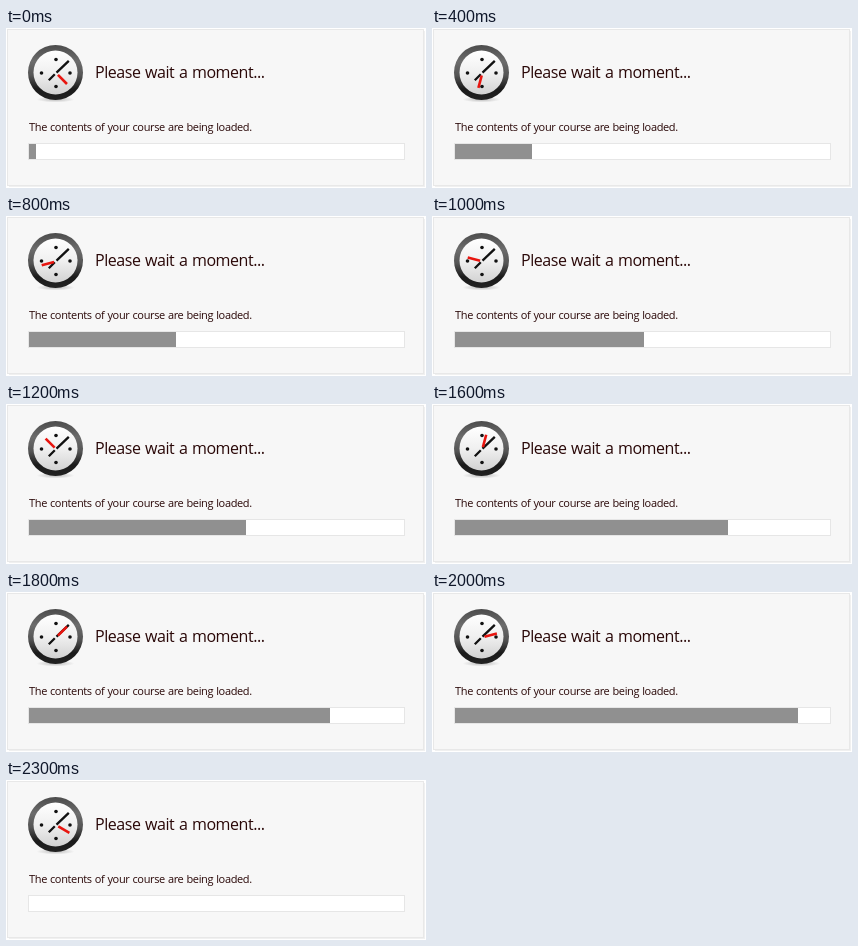
Recreate the animation shown at these times as an HTML page. Size 420 px wide and 160 px high, loop 2.4 s.

```html
<!DOCTYPE html>
<html lang="en">
<head>
<meta charset="utf-8">
<title>Loading</title>
<style>
  html, body { margin: 0; width: 100%; height: 100%; overflow: hidden; background: #fff; }
  svg { display: block; }
  text { font-family: "Open Sans", "Noto Sans", sans-serif; fill: #2a0808; }
  .title { font-size: 16px; letter-spacing: -.45px; word-spacing: .9px; }
  .note { font-size: 11px; letter-spacing: -.35px; word-spacing: .5px; }
</style>
</head>
<body>
<svg width="420" height="160" viewBox="0 0 420 160">
  <defs>
    <linearGradient id="rim" x2="0" y2="1">
      <stop stop-color="#4c4c4c"/>
      <stop offset=".3" stop-color="#6c6c6c"/>
      <stop offset=".55" stop-color="#555"/>
      <stop offset=".8" stop-color="#1a1a1a"/>
      <stop offset="1" stop-color="#222"/>
    </linearGradient>
    <linearGradient id="face" x2="0" y2="1">
      <stop stop-color="#fff"/>
      <stop offset=".5" stop-color="#f0f0f0"/>
      <stop offset="1" stop-color="#d2d2d2"/>
    </linearGradient>
    <radialGradient id="shade">
      <stop stop-color="#bbb"/>
      <stop offset="1" stop-color="#f7f7f7"/>
    </radialGradient>
  </defs>

  <!-- panel -->
  <rect x="3" y="3" width="416" height="156" fill="#f0f0f0"/>
  <rect x="1.5" y="1.5" width="416" height="156" fill="#f7f7f7" stroke="#e8e8e8"/>

  <!-- clock -->
  <ellipse cx="49.5" cy="71.5" rx="19" ry="3" fill="url(#shade)"/>
  <circle cx="49.5" cy="44.5" r="27.5" fill="url(#rim)"/>
  <circle cx="49.5" cy="44.5" r="22" fill="url(#face)"/>
  <g fill="#111">
    <circle cx="50" cy="31.5" r="1.8"/>
    <circle cx="64" cy="45" r="1.8"/>
    <circle cx="50" cy="58.5" r="1.8"/>
    <circle cx="35.5" cy="45" r="1.8"/>
  </g>
  <path d="M42.8 52.2L48.8 46.3M50.5 44.7L62.8 32.8" stroke="#111" stroke-width="2.3"/>
  <path id="hand" d="M50.3 43V30.2" stroke="#e8150f" stroke-width="2.6"/>

  <text class="title" x="89" y="50">Please wait a moment...</text>
  <text class="note" x="23" y="103">The contents of your course are being loaded.</text>

  <!-- progress bar -->
  <rect x="22.5" y="115.5" width="376" height="16" fill="#fff" stroke="#e6e6e6"/>
  <rect id="fill" x="23" y="116" height="15" fill="#909090"/>
</svg>
<script>
  const hand = document.getElementById("hand");
  const fill = document.getElementById("fill");
  const STEP = 100, STEPS = 24, FULL = 375;

  // The bar grows in 14 px blocks, a little slower between steps 12 and 18.
  function barWidth(step) {
    if (step === STEPS - 1) return 0;
    const blocks = step <= 12 ? Math.round(step * 1.25)
      : step <= 18 ? step + 3
      : 21 + Math.floor((step - 18) * 1.5);
    return Math.min(FULL, 7 + 14 * blocks);
  }

  function draw(now) {
    const step = Math.floor(now / STEP) % STEPS;
    hand.setAttribute("transform", `rotate(${135 + step * 15} 50.3 45.3)`);
    fill.setAttribute("width", barWidth(step));
    requestAnimationFrame(draw);
  }
  draw(performance.now());
</script>
</body>
</html>
```
